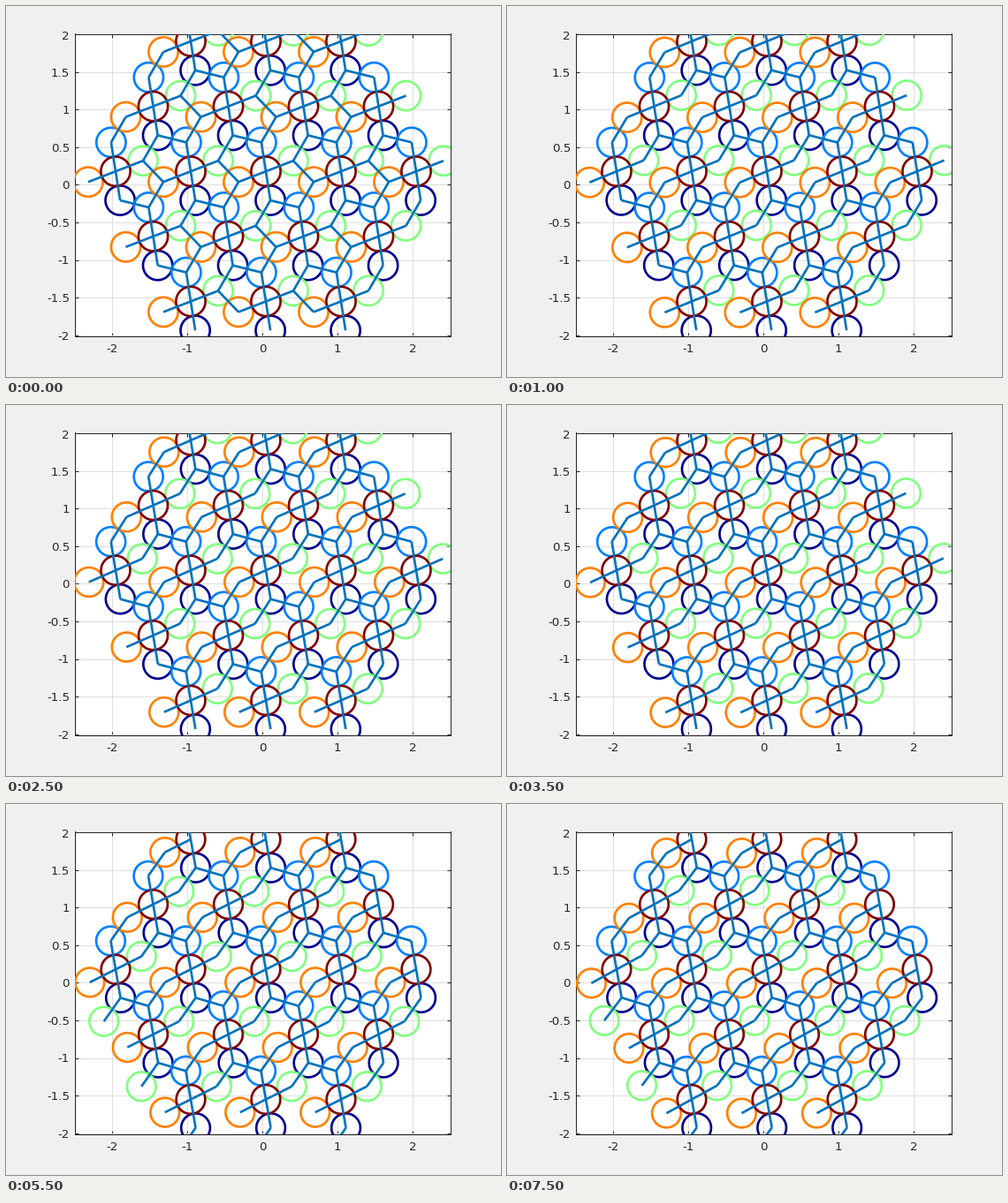
A matplotlib script for the animation above (8000 ms loop, 560 by 420 pixels).

```python
import numpy as np
import matplotlib.pyplot as plt
from matplotlib.animation import FuncAnimation
from matplotlib.collections import LineCollection

W, H, DPI = 560, 420, 80
PT = 72 / DPI  # points per pixel
LEFT, RIGHT, TOP, BOTTOM = 77.5, 502.5, 31.5, 373.5
SCALE = 85     # pixels per data unit
FRAMES, INTERVAL = 16, 500
START, STEP = 21.15, 0.5  # tilt of the orange-green arm, degrees

INK = "#262626"
COLORS = ["#00008f", "#0080ff", "#80ff80", "#ff8000", "#800000"]
GREEN = 2

HUB = np.array([0.047, 0.18])
X = np.array([1.0, 0.0])
U = np.array([0.5, np.sqrt(3) / 2])
CELLS = np.array([i * X + j * U
                  for j in range(-2, 3) for i in range(-2, 3)
                  if abs(i + j) <= 2])
TURN = np.linspace(0, 2 * np.pi, 73)
RING = np.column_stack([np.cos(TURN), np.sin(TURN)])


def polar(length, degrees):
    a = np.radians(degrees)
    return length * np.array([np.cos(a), np.sin(a)])


def arms(tilt, gamma):
    """Disc diameter and the two arms for a given pair of angles."""
    c = np.cos(np.radians(gamma))
    d = (4 * c - np.sqrt(16 * c * c - 12)) / 6
    return d, polar(d, -60 - gamma), polar(d, 180 + tilt)


def solve(tilt):
    """Bisect for the second angle that keeps neighbouring discs touching."""
    lo, hi = 17.0, 23.0
    for _ in range(50):
        mid = (lo + hi) / 2
        d, a, b = arms(tilt, mid)
        if np.hypot(*(U + a + b)) > d:
            lo = mid
        else:
            hi = mid
    return arms(tilt, lo)


def layout(frame):
    d, a, b = solve(START + STEP * frame)
    motif = HUB + np.array([a, -a, -b, b, 0 * a])
    if frame >= 11:  # green disc wraps to the opposite side of its cell
        motif[GREEN] -= U
    points = (motif[:, None] + CELLS[None]).reshape(-1, 2)
    return d, points


def contacts(d, points):
    dist = np.hypot(*(points[:, None] - points[None]).transpose(2, 0, 1))
    i, j = np.nonzero(np.triu(dist < 1.01 * d, 1))
    return np.stack([points[i], points[j]], axis=1)


plt.rcParams.update({"font.family": "DejaVu Sans", "axes.unicode_minus": False})
fig = plt.figure(figsize=(W / DPI, H / DPI), dpi=DPI, facecolor="#f0f0f0")
ax = fig.add_axes([LEFT / W, 1 - BOTTOM / H,
                   (RIGHT - LEFT) / W, (BOTTOM - TOP) / H])
half_w, half_h = (RIGHT - LEFT) / SCALE / 2, (BOTTOM - TOP) / SCALE / 2
ax.set_xlim(-half_w, half_w)
ax.set_ylim(-half_h, half_h)

xticks, yticks = np.arange(-2, 3), np.arange(-4, 5) / 2
ax.set_xticks(xticks, [f"{v:g}" for v in xticks])
ax.set_yticks(yticks, [f"{v:g}" for v in yticks])
ax.tick_params(direction="in", top=True, right=True, length=4.25 * PT,
               width=PT, color=INK, labelcolor=INK, labelsize=13.33 * PT)
ax.tick_params(axis="x", pad=8.4 * PT)
ax.tick_params(axis="y", pad=5.6 * PT)
ax.grid(True, color="#dedede", linewidth=PT)
ax.set_axisbelow(True)
for spine in ax.spines.values():
    spine.set(color=INK, linewidth=PT, zorder=0.8)

LINE = 2.67 * PT
rings = LineCollection([], colors=np.repeat(COLORS, len(CELLS)),
                       linewidths=LINE, zorder=2)
bonds = LineCollection([], colors="#0072bd", linewidths=LINE, zorder=3)
ax.add_collection(rings, autolim=False)
ax.add_collection(bonds, autolim=False)


def draw(frame):
    d, points = layout(frame)
    rings.set_segments(points[:, None] + d / 2 * RING)
    bonds.set_segments(contacts(d, points))
    return rings, bonds


anim = FuncAnimation(fig, draw, frames=FRAMES, interval=INTERVAL,
                     repeat=True, repeat_delay=0)
plt.show()
```
